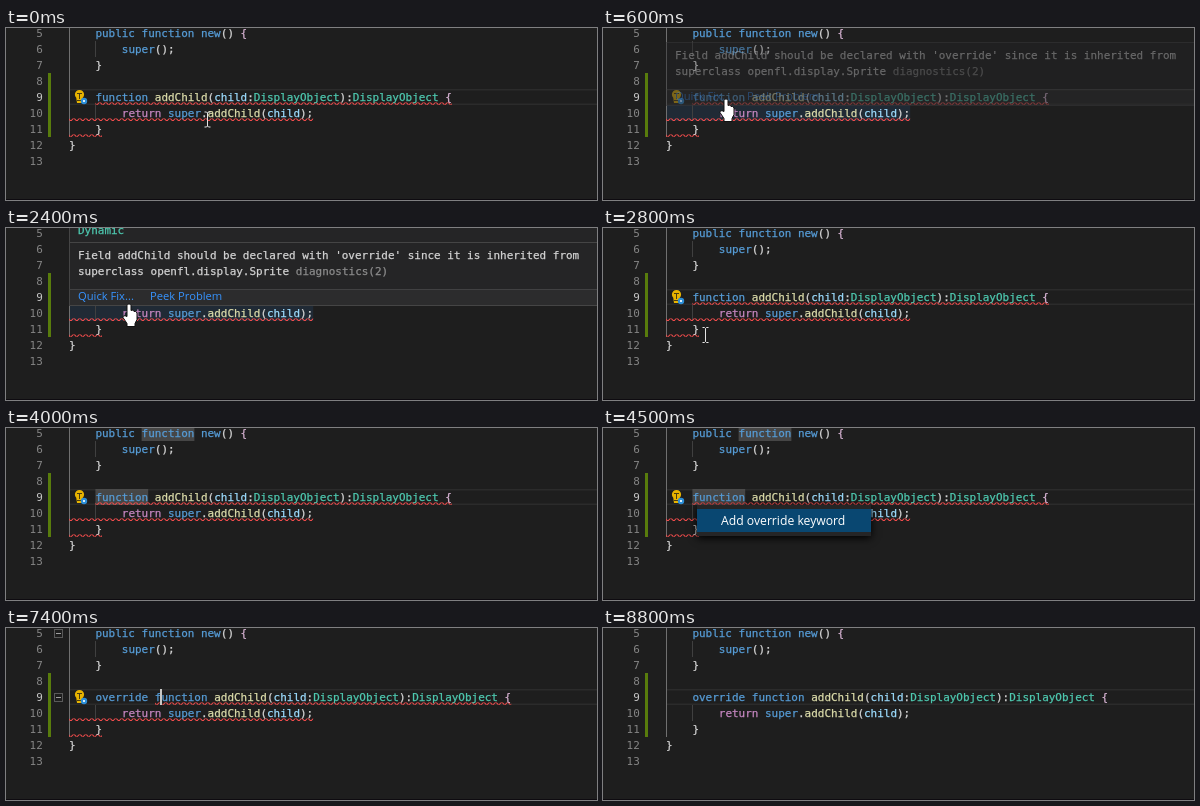
An HTML page with a canvas that plays this animation: 591x172 px, repeating every 9.7 s.

```html
<!DOCTYPE html>
<html lang="en">
<head>
<meta charset="utf-8">
<title>Quick fix</title>
<style>
html, body { margin: 0; width: 591px; height: 172px; overflow: hidden; background: #1e1e1e; }
canvas { display: block; width: 591px; height: 172px; }
</style>
</head>
<body>
<canvas id="stage"></canvas>
<script>
const W = 591, H = 172, LOOP = 9700, STEP = 100;
const LEFT = 63, CH = 6.6, ROW = 16;
const MONO = '10.96px "DejaVu Sans Mono", monospace';
const UI = '"Open Sans", "Noto Sans", sans-serif';
const C = {
  bg: '#1e1e1e', key: '#569cd6', ctl: '#c586c0', fn: '#dcdcaa', arg: '#9cdcfe',
  type: '#4ec9b0', text: '#d4d4d4', brace: '#d8b4d4', error: '#f14c4c'
};

const canvas = document.getElementById('stage');
const ctx = canvas.getContext('2d', { alpha: false });
const dpr = window.devicePixelRatio || 1;
canvas.width = W * dpr;
canvas.height = H * dpr;

const colX = col => LEFT + col * CH;
const rowY = line => (line - 5) * ROW - 3;
const clamp = v => Math.max(0, Math.min(1, v));

function rect(x, y, w, h, color) {
  ctx.fillStyle = color;
  ctx.fillRect(x, y, w, h);
}

// weight: thin outline that firms up the stems
function label(str, x, y, color, font = MONO, weight = 0) {
  ctx.font = font;
  ctx.fillStyle = ctx.strokeStyle = color;
  ctx.fillText(str, x, y);
  if (weight) {
    ctx.lineWidth = weight;
    ctx.strokeText(str, x, y);
  }
}

// parts: alternating text and colour key
function code(line, col, ...parts) {
  for (let i = 0; i < parts.length; i += 2) {
    label(parts[i], colX(col), rowY(line) + 12, C[parts[i + 1]], MONO, 0.25);
    col += parts[i].length;
  }
}

function poly(...p) {
  ctx.moveTo(p[0], p[1]);
  for (let i = 2; i < p.length; i += 2) ctx.lineTo(p[i], p[i + 1]);
  ctx.closePath();
}

function squiggle(line, from, to) {
  const x0 = colX(from), x1 = colX(to), y = rowY(line) + 13;
  ctx.save();
  ctx.beginPath();
  ctx.rect(x0, y, x1 - x0, 3);
  ctx.clip();
  ctx.fillStyle = C.error;
  ctx.beginPath();
  for (let x = Math.round(x0); x < x1; x += 6) {
    poly(x + 5.5, y, x + 2.5, y + 3, x + 1.1, y + 3, x + 4.1, y);
    poly(x + 4, y, x + 6, y + 2, x + 6, y + 0.6, x + 5.4, y);
    poly(x, y + 2, x + 1, y + 3, x + 2.4, y + 3, x, y + 0.6);
  }
  ctx.fill();
  ctx.restore();
}

function bulb() {
  ctx.beginPath();
  ctx.arc(73.5, 66.5, 4.6, Math.PI * 0.75, Math.PI * 2.25);
  ctx.lineTo(76, 75);
  ctx.lineTo(71, 75);
  ctx.closePath();
  ctx.fillStyle = '#e8b400';
  ctx.fill();
  rect(71, 65, 5, 1, '#4a3c10');
  rect(73, 66, 1, 5, '#4a3c10');
  rect(71, 72, 5, 1, '#4a3c10');
  ctx.beginPath();
  ctx.arc(78, 73, 3.2, 0, Math.PI * 2);
  ctx.fillStyle = '#2d8fd8';
  ctx.fill();
  rect(77, 72, 2, 2, '#d8ecfa');
}

function foldIcon(line, alpha) {
  const y = rowY(line) + 4;
  ctx.globalAlpha = alpha;
  ctx.strokeStyle = '#5a5a5a';
  ctx.lineWidth = 1;
  ctx.strokeRect(48.5, y + 0.5, 8, 8);
  rect(50, y + 4, 5, 1, '#a0a0a0');
  ctx.globalAlpha = 1;
}

const hovering = t => t >= 600 && t < 2600;

function editor(t) {
  const fixed = t >= 5300, broken = t < 8100;
  const shift = fixed ? 9 : 0;

  rect(0, 0, W, H, C.bg);
  rect(LEFT, 61, W - LEFT, 1.5, '#2b2b2b');
  rect(LEFT, 75.5, W - LEFT, 1.5, '#2b2b2b');
  if (t >= 3700 && t < 5300) {
    rect(colX(11), rowY(5), 8 * CH, ROW, 'rgba(87,87,87,.72)');
    rect(colX(4), rowY(9), 8 * CH, ROW, 'rgba(87,87,87,.72)');
  }
  if (hovering(t)) rect(LEFT, rowY(10), 37 * CH, ROW, '#202a35');
  rect(63, 0, 1, 109, '#707070');
  rect(89, 13, 1, ROW, '#404040');
  rect(89, 77, 1, ROW, '#404040');
  rect(42, 45, 3, 64, '#587c0c');

  if (broken) {
    squiggle(9, 4 + shift, 58 + shift);
    squiggle(10, 0, 37);
    squiggle(11, 0, 5);
    bulb();
  }

  for (let n = 5; n <= 13; n++) {
    const s = String(n);
    label(s, 36.8 - s.length * CH, rowY(n) + 12, n === 9 ? '#c6c6c6' : '#858585');
  }
  code(5, 4, 'public function new', 'key', '() ', 'text', '{', 'brace');
  code(6, 8, 'super', 'key', '();', 'text');
  code(7, 4, '}', 'text');
  if (fixed) code(9, 4, 'override', 'key');
  code(9, 4 + shift, 'function ', 'key', 'addChild', 'fn', '(', 'text', 'child', 'arg',
    ':', 'text', 'DisplayObject', 'type', '):', 'text', 'DisplayObject', 'type', ' ', 'text', '{', 'brace');
  code(10, 8, 'return ', 'ctl', 'super', 'key', '.', 'text', 'addChild', 'fn',
    '(', 'text', 'child', 'arg', ');', 'text');
  code(11, 4, '}', 'text');
  code(12, 0, '}', 'text');
  rect(0, 171, W, 1, '#0e0b10');

  const fold = t < 7600 ? clamp((t - 7000) / 400) : clamp((8800 - t) / 1200);
  if (fold > 0) [5, 9].forEach(n => foldIcon(n, fold));

  const caretOn = fixed ? Math.floor((t - 5300) / 500) % 2 === 0 : t >= 3500 && t < 4000;
  if (caretOn) rect(fixed ? 154 : 95, 61, 2, ROW, '#c8c8c6');
}

function hover(t) {
  if (!hovering(t)) return;
  const top = t < 1000 ? 14 : -8;
  ctx.globalAlpha = t < 700 ? 0.34 : 1;
  rect(LEFT, top, W - LEFT, 78 - top, '#252526');
  rect(LEFT, top, 1, 78 - top, '#454545');
  rect(LEFT, 14, W - LEFT, 1, '#454545');
  rect(LEFT + 1, 61, W - LEFT, 16, '#2c2c2d');
  rect(LEFT, 61, W - LEFT, 1, '#414142');
  rect(LEFT, 77, W - LEFT, 1, '#454545');
  if (t >= 1000) label('Dynamic', 72, 6, C.type, MONO, 0.25);
  label("Field addChild should be declared with 'override' since it is inherited from", 72, 31, C.text, MONO, 0.25);
  label('superclass openfl.display.Sprite', 72, 47, C.text, MONO, 0.25);
  label('diagnostics(2)', 72 + 33 * CH, 47, '#8c8c8c', MONO, 0.25);
  label('Quick Fix...', 72, 72, '#3794ff', '11.2px ' + UI);
  label('Peek Problem', 144, 72, '#3794ff', '11.2px ' + UI);
  ctx.globalAlpha = 1;
}

function menu(t) {
  if (t < 4400 || t >= 5300) return;
  ctx.save();
  ctx.globalAlpha = t < 4500 ? 0.5 : 1;
  ctx.shadowColor = '#000';
  ctx.shadowBlur = 8 * dpr;
  ctx.shadowOffsetY = 2 * dpr;
  rect(94, 77, 174, 31, '#252526');
  ctx.shadowColor = 'transparent';
  rect(94, 81, 174, 23, '#094771');
  label('Add override keyword', 118, 97, '#fff', '12.2px ' + UI);
  ctx.restore();
}

function beam(x, y) {
  ctx.beginPath();
  for (const s of [-1, 1]) {
    ctx.moveTo(x - 3, y + 7.5 * s);
    ctx.lineTo(x - 1, y + 7.5 * s);
    ctx.lineTo(x, y + 6.5 * s);
    ctx.lineTo(x + 1, y + 7.5 * s);
    ctx.lineTo(x + 3, y + 7.5 * s);
  }
  ctx.moveTo(x, y - 6.5);
  ctx.lineTo(x, y + 6.5);
  ctx.strokeStyle = '#e4e4e4';
  ctx.lineWidth = 1;
  ctx.stroke();
}

function hand(x, y) {
  ctx.save();
  ctx.translate(x, y);
  ctx.beginPath();
  ctx.moveTo(-2, 2);
  ctx.quadraticCurveTo(0, -1.5, 2, 2);
  ctx.lineTo(2, 7);
  ctx.quadraticCurveTo(4, 5.5, 5, 8);
  ctx.quadraticCurveTo(7, 7, 8, 9.5);
  ctx.lineTo(8, 16);
  ctx.lineTo(6, 20);
  ctx.lineTo(6, 23);
  ctx.lineTo(-2, 23);
  ctx.lineTo(-2, 20);
  ctx.lineTo(-6, 14);
  ctx.quadraticCurveTo(-6, 11, -2, 13);
  ctx.closePath();
  ctx.fillStyle = '#fff';
  ctx.fill();
  ctx.strokeStyle = '#111';
  ctx.lineWidth = 1;
  ctx.stroke();
  ctx.restore();
}

// pointer stops: time, x, y
const PATH = [
  [0, 201.5, 91.5], [300, 123.5, 79.5], [2300, 123.5, 79.5], [2400, 123.5, 84.5],
  [2800, 102.5, 107], [2900, 102.5, 107], [3000, 102.5, 106], [3100, 102.5, 106],
  [3500, 97.5, 69.5], [3700, 135.5, 69.5], [4000, 135.5, 69.5]
];

function pointer(t) {
  if (t >= 4000) return;
  const i = PATH.findIndex(p => p[0] > t);
  const [a, b] = [PATH[i - 1], PATH[i]];
  const k = (t - a[0]) / (b[0] - a[0]);
  const x = a[1] + (b[1] - a[1]) * k;
  const y = a[2] + (b[2] - a[2]) * k;
  if (t >= 600 && t < 2500) hand(x - 0.5, y - 9);
  else beam(x, y);
}

function draw(now) {
  const t = Math.floor((now % LOOP) / STEP) * STEP;
  ctx.setTransform(dpr, 0, 0, dpr, 0, 0);
  editor(t);
  hover(t);
  menu(t);
  pointer(t);
}

let start = null;
function tick(now) {
  if (start === null) start = now;
  draw(now - start);
  requestAnimationFrame(tick);
}
draw(0);
requestAnimationFrame(tick);
</script>
</body>
</html>
```
